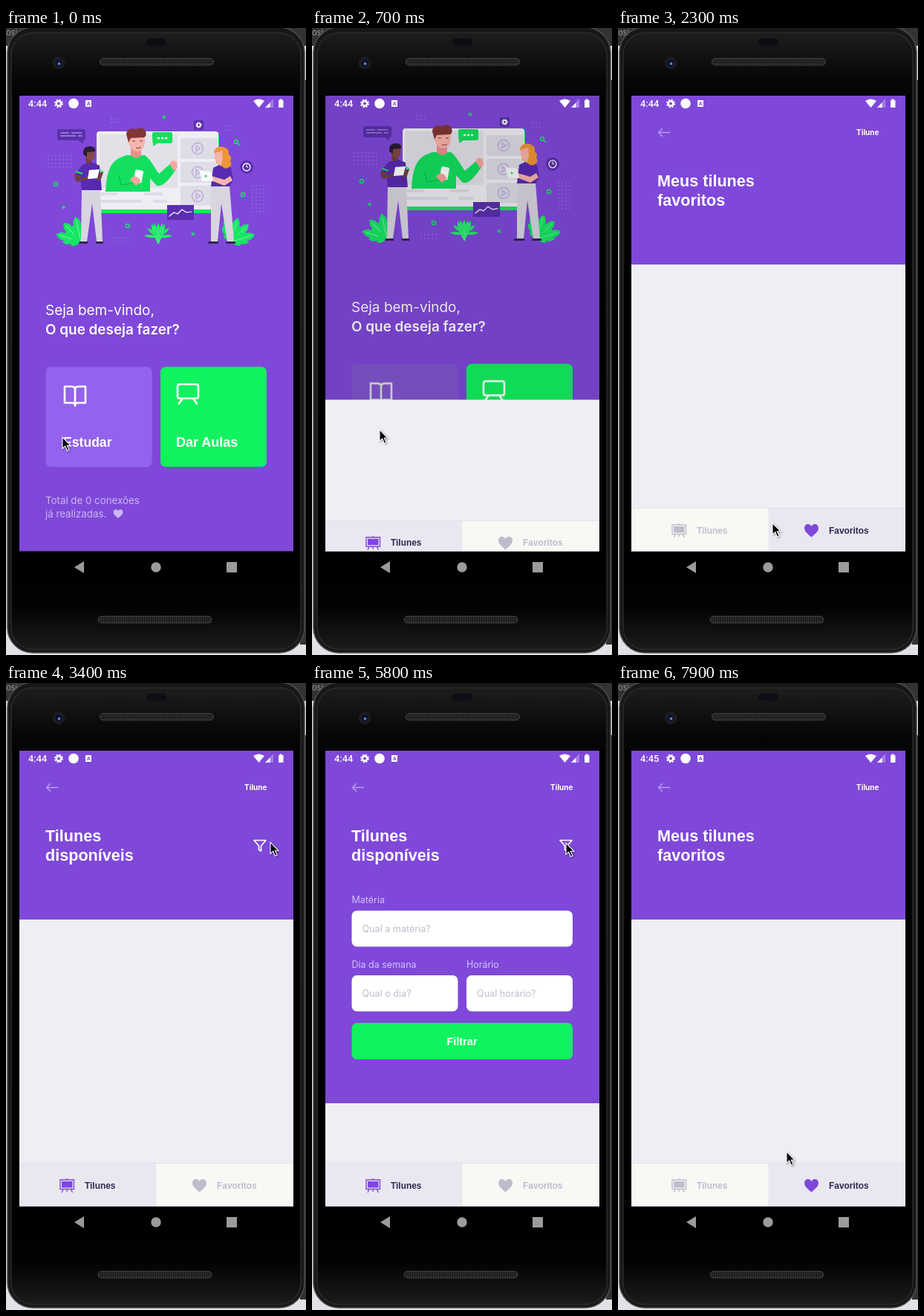
Write an HTML page that moves like this. It is 404 px wide and 843 px high and loops after 8 s.

```html
<!DOCTYPE html>
<html lang="pt-BR">
<head>
<meta charset="utf-8">
<style>
html, body { margin: 0; width: 100%; height: 100%; overflow: hidden; background: #e2e2e6 }
svg { display: block }
text { font-family: "Liberation Sans", Arial, sans-serif; font-weight: 700; fill: #fff }
.soft { font-family: Inter, sans-serif; font-weight: 400 }
.semi { font-family: Inter, sans-serif; font-weight: 600 }
.title { font-size: 21.6px }
.tab text { font-size: 11.9px; fill: #c1bccc }
.tab rect.bg { fill: #f7f9f5 }
.tab { color: #c1bccc }
.tab.on { color: #7f48d9 }
.tab.on text { fill: #32264d }
.tab.on rect.bg { fill: #e9e8f1 }
.line { fill: none; stroke: #fff; stroke-linecap: round; stroke-linejoin: round }
</style>
</head>
<body>
<svg width="404" height="843" viewBox="0 0 404 843">
<defs>
  <clipPath id="screen"><path d="M18 91H387V703.5H18Z"/></clipPath>
  <clipPath id="reveal"><rect id="window" x="18" y="91" width="369" height="613"/></clipPath>
  <pattern id="dots" width="5" height="5" patternUnits="userSpaceOnUse"><circle cx="2" cy="2" r=".7" fill="#a783ea"/></pattern>
  <pattern id="mesh" width="3" height="3" patternUnits="userSpaceOnUse"><path d="M0 0H2V2H0Z" fill="#343434"/></pattern>
  <linearGradient id="body" x2="0" y2="1">
    <stop stop-color="#1d1d1d"/><stop offset=".08" stop-color="#050505"/>
    <stop offset=".93" stop-color="#020202"/><stop offset="1" stop-color="#1c1c1c"/>
  </linearGradient>
  <path id="broad" d="M0 0C-3-2-7-5-6-9L-4-8C-7-12-7-15-5-18L-3-16C-5-20-3-23 0-26C3-23 5-20 3-16L5-18C7-15 7-12 4-8L6-9C7-5 3-2 0 0"/>
  <path id="thin" d="M-.6 0C-1-6-3-11-3-15Q-2-22 0-26Q2-22 3-15C3-11 1-6 .6 0Z"/>
  <path id="heart" d="M0 9C-6 4-9.5 1-9.5-3.2C-9.5-9-2.5-10.5 0-5.5C2.5-10.5 9.5-9 9.5-3.2C9.5 1 6 4 0 9Z"/>
  <g id="gear" fill="none" stroke="#fff"><circle r="3.2" stroke-width="2.4"/><circle r="5" stroke-width="1.8" stroke-dasharray="2.2 1.73"/></g>
  <g id="play" fill="none" stroke="#c3b5e0" stroke-width="1.8"><circle r="7.5"/><path d="M-2-3.5V3.5L3.5 0Z"/></g>
  <g id="speaker"><rect width="153" height="9" rx="4.5" fill="#161616"/><rect width="153" height="9" rx="4.5" fill="url(#mesh)" stroke="#454545"/></g>
</defs>

<!-- desktop and phone -->
<path d="M0 0H404V24H0ZM396 70H404V829H396Z" fill="#333"/>
<text class="soft" x="0" y="10" font-size="11" style="fill:#999">osi</text>
<rect x="2" y="-1" width="400" height="841" rx="34" fill="#171717" stroke="#4a4a4a" stroke-width="1.600"/>
<rect x="7" y="6.500" width="390" height="829" rx="29" fill="url(#body)" stroke="#2b2b2b" stroke-width="1.500"/>
<path d="M10 90H394V750H10Z"/>
<rect x="189" y="14" width="27" height="10" rx="5" fill="#0d0d14"/>
<circle cx="71" cy="47" r="8.500" fill="#1c1c20"/><circle cx="71" cy="47" r="4.500" fill="#0b1230"/><circle cx="71.500" cy="48" r="1.800" fill="#6d8be0"/>
<use href="#speaker" x="126.500" y="41"/><use href="#speaker" x="124" y="791"/>
<path d="M105 717V733L92 725ZM297 718H311V732H297Z" fill="#9b9b9b"/><circle cx="202" cy="725" r="6.700" fill="#9b9b9b"/>

<g clip-path="url(#screen)">
<path d="M18 91H387V704H18Z" fill="#7f48d9"/>
<g id="home">
  <path d="M53 168H88V189H53ZM331 210H351V249H331ZM140 120H155V128H140ZM295 130H310V138H295ZM145 279H170V288H145Z" fill="url(#dots)"/>
  <g id="plants" fill="#17e663"></g>
  <!-- monitor -->
  <rect x="123" y="140" width="164" height="109" rx="4" fill="#17e663"/>
  <rect x="122" y="139" width="164" height="105" rx="4" fill="#f0eef5"/>
  <path d="M126 143H231V215H126Z" fill="#e2e1e8"/>
  <g fill="#dedde6">
    <rect x="235" y="148" width="50" height="28" rx="3"/><rect x="235" y="180" width="50" height="28" rx="3"/><rect x="235" y="212" width="50" height="27" rx="3"/>
    <path d="M127 221H150V225H127ZM186 221H211V225H186ZM127 231H183V235H127ZM198 231H217V235H198Z"/>
  </g>
  <use href="#play" x="258" y="162"/><use href="#play" x="258" y="194"/><use href="#play" x="258" y="226"/>
  <!-- presenter -->
  <path d="M134 220C136 186 143 177 162 171H187C196 178 200 188 206 196L222 182L229 190C219 205 211 214 203 212L194 202V220Z" fill="#13df5e"/>
  <path d="M152 198L155 211L174 208" fill="none" stroke="#0cae47"/>
  <path d="M220 183L224 178L230 180L231 188L226 192Z" fill="#f4a7a0"/>
  <path d="M168 158H182V172Q175 178 168 171Z" fill="#ea918c"/>
  <path d="M165 145H187V155Q185 166 176 166Q167 164 165 154Z" fill="#f7b4aa"/>
  <path d="M165 154L162 143Q163 133 175 136Q186 132 188 139Q190 145 186 147L168 148Z" fill="#823536"/>
  <path d="M170 152H174M180 152H184M175 161Q179 163 182 160" fill="none" stroke="#713637"/>
  <rect x="173" y="191" width="11" height="17" rx="2" fill="#fff" transform="rotate(10 179 199)"/>
  <path d="M167 204Q171 197 178 201L182 206L175 212Z" fill="#f4a7a0"/>
  <!-- messages -->
  <path d="M199 140H222Q224 140 224 142V153Q224 155 222 155H204L198 159V155Q197 154 197 142Q197 140 199 140" fill="#13df5e"/>
  <path d="M205 148H206M210 148H211M215 148H216" class="line" stroke-width="2.500"/>
  <path d="M71 136H105Q107 136 107 138V149Q107 151 105 151H104V156L98 151H71Q69 151 69 149V138Q69 136 71 136" fill="#5b2fae"/>
  <path d="M73 141H85M88 141H102M73 145H94M97 145H103" stroke="#a98bdd" stroke-width="1.300"/>
  <!-- left figure -->
  <path d="M102 216H127L130 287H122L116 236L109 287H101Z" fill="#d8d5e0"/>
  <path d="M99 287H110V290H98ZM121 287H131V290H121Z" fill="#32264d"/>
  <path d="M103 184L115 180L126 185L129 218H102L100 202L93 196Z" fill="#572ab0"/>
  <path d="M94 193L103 196M126 191L131 194" stroke="#17e663" stroke-width="2"/>
  <path d="M93 196L101 199L99 203L113 198L115 202L96 207Q91 204 93 196M107 173H115V182L108 183ZM126 194L131 194L128 203L121 205Z" fill="#713f3f"/>
  <path d="M106 164H119V175Q114 182 108 175Z" fill="#814a46"/>
  <path d="M104 170Q103 159 113 159Q121 159 120 166L109 167V173Z" fill="#291d37"/>
  <path d="M112 191L126 190L123 202L110 203Z" fill="#fff"/>
  <!-- right figure -->
  <path d="M276 212H301L307 287H298L290 236L285 287H276Z" fill="#d8d5e0"/>
  <path d="M273 287H286V290H271ZM297 287H309V290H296Z" fill="#32264d"/>
  <path d="M279 188L291 182L303 188L306 205L301 213H276Z" fill="#572ab0"/>
  <path d="M280 166Q283 158 293 160Q301 162 300 170Q305 174 302 178Q306 185 299 188Q294 190 291 186L283 181Z" fill="#ed9635"/>
  <path d="M281 168L291 165L292 176L289 186L284 180Q280 178 281 168M277 199L294 204L302 199L305 205L294 212L276 205Z" fill="#f6b4aa"/>
  <path d="M260 191L276 193L279 206L264 206Z" fill="#f8f7fc"/><circle cx="269" cy="199" r="1.500" fill="#13df5e"/>
  <!-- small ornaments -->
  <path d="M217 238H253V258H217Z" fill="#5b2fae"/>
  <path d="M220 253L226 248L231 250L237 244L243 248L250 247" class="line" stroke-width="1.200"/>
  <rect x="253" y="124" width="13" height="13" rx="2" fill="#5b2fae"/><use href="#gear" transform="translate(259.500 130.500) scale(.7)"/>
  <circle cx="324" cy="187" r="9" fill="#5b2fae"/><circle cx="324" cy="187" r="5" class="line" stroke-width="1.300"/><path d="M324 184V187H326" class="line"/>
  <g fill="none" stroke="#17e663" stroke-width="1.500">
    <circle cx="67" cy="210" r="2.500"/><circle cx="164" cy="266" r="2.500"/><circle cx="319" cy="224" r="2.500"/><circle cx="310" cy="153" r="2.500"/>
    <path d="M312 155L315 158M75 241H80M77.500 238.500V243.500M211 118L215 122M215 118L211 122M250 275L254 279M254 275L250 279"/>
  </g>
  <!-- home text and cards -->
  <text class="soft" x="53" y="386" font-size="19">Seja bem-vindo,</text>
  <text class="semi" x="53" y="412" font-size="18.900">O que deseja fazer?</text>
  <rect x="53.500" y="455.500" width="143" height="134.500" rx="7" fill="#9463ed"/>
  <rect x="208" y="455.500" width="143" height="134.500" rx="7" fill="#11f25f"/>
  <g class="line" stroke-width="2.600">
    <path d="M93 486Q93 482 88 482H79V504H89Q93 504 93 508ZM93 486Q93 482 98 482H107V504H97Q93 504 93 508"/>
    <path d="M234 479H256Q259 479 259 482V495Q259 498 256 498H234Q231 498 231 495V482Q231 479 234 479M238 498L233 505M252 498L257 505"/>
  </g>
  <text x="77" y="563" font-size="17.600">Estudar</text><text x="229" y="563" font-size="18">Dar Aulas</text>
  <rect id="cardPress" x="53.500" y="455.500" width="143" height="134.500" rx="7"/>
  <text class="soft" x="53" y="640" font-size="13.300" style="fill:#ccb6f3">Total de 0 conexões</text>
  <text class="soft" x="53" y="657.500" font-size="13.300" style="fill:#ccb6f3">já realizadas.</text>
  <use href="#heart" transform="translate(151 653) scale(.68)" fill="#ccb6f3"/>
</g>
<path id="shade" d="M18 91H387V704H18Z"/>

<g clip-path="url(#reveal)"><g id="list">
  <path d="M18 91H387V704H18Z" fill="#eeeef4"/>
  <rect id="header" x="18" y="91" width="369" height="227" fill="#7f48d9"/>
  <g id="topBar">
    <path d="M69.500 140.500H54.500M59.500 135.500L54.500 140.500L59.500 145.500" class="line" style="stroke:#b99af0" stroke-width="1.500"/>
    <text class="semi" x="321" y="144" font-size="10" style="font-weight:700">Tilune</text>
  </g>
  <text class="title" x="53" y="213" id="title1"></text>
  <text class="title" x="53" y="239" id="title2"></text>
  <g id="filter">
    <circle id="ripple" cx="341.500" cy="218.500" r="10"/>
    <path d="M334 211.500H350L343.500 219V226L340.500 224.300V219Z" class="line" stroke-width="1.700"/>
  </g>
  <g id="form"></g>
  <g id="tabList" class="tab">
    <rect class="bg" x="18" y="646" width="184.500" height="58"/>
    <path d="M73 668H91.500V680.500H73ZM77 681L75 685M87.500 681L89.500 685M82.200 681V684M82.200 668V666" fill="none" stroke="currentColor" stroke-width="1.400"/>
    <path d="M75 670H89.500V678.500H75Z" fill="currentColor"/>
    <text x="106" y="679.500">Tilunes</text>
  </g>
  <g id="tabFav" class="tab">
    <rect class="bg" x="202.500" y="646" width="185" height="58"/>
    <use href="#heart" x="260.500" y="675.500" fill="currentColor"/>
    <text x="284" y="679.500">Favoritos</text>
  </g>
  <path d="M18 645.500H387" stroke="#e2e2ea"/>
</g></g>

<!-- status bar -->
<text id="clock" x="30" y="106" font-size="12.800" style="font-family:Roboto,sans-serif;font-weight:500"></text>
<use href="#gear" x="71" y="101.500"/>
<g fill="#fff">
  <circle cx="91" cy="101.500" r="6.800"/>
  <path d="M107 97H115V106H107ZM333 98Q340.500 93 348 98L340.500 107ZM360 95.500V107H349Z"/>
  <path d="M367 97H368.500V95.500H371.500V97H373.500V107H367Z"/>
</g>
<path d="M355 95V100.500L360 95Z" fill="#7f48d9"/><path d="M355.500 100V107H360V95.500Z" fill="#a47ee5"/>
<text x="108.700" y="104.300" font-size="7" style="fill:#7f48d9">A</text>
</g>

<path id="cursor" d="M0 0V15.500L3.700 12.200L6.400 18.500L9 17.400L6.300 11.300H11Z" fill="#000" stroke="#fff" stroke-width="1.100" style="filter:drop-shadow(1px 1px 1px #0006)"/>
</svg>

<script>
const LOOP = 8000, STEP = 100, HEIGHT = 613;
const $ = id => document.getElementById(id);
const clamp = v => Math.max(0, Math.min(1, v));

// time, x, y
const cursorPath = [
  [0, 76, 550], [400, 91, 540], [1100, 91, 540], [1400, 249, 619], [1500, 249, 619],
  [1700, 291, 667], [2200, 291, 667], [2400, 125, 664], [2900, 125, 664], [3400, 356, 214],
  [4000, 356, 214], [4200, 350, 201], [4300, 345, 208], [5000, 345, 208], [5100, 343, 214],
  [5400, 343, 214], [5500, 342, 215], [6500, 342, 215], [7000, 270, 672], [7400, 270, 672],
  [7600, 247, 624], [7800, 247, 624], [7900, 227, 630], [8000, 227, 630]
];

function cursorAt(t) {
  const i = cursorPath.findIndex(k => k[0] > t);
  const [t0, x0, y0] = cursorPath[i - 1], [t1, x1, y1] = cursorPath[i];
  const f = (t - t0) / (t1 - t0);
  return [x0 + (x1 - x0) * f, y0 + (y1 - y0) * f];
}

function bezier(x, x1, y1, x2, y2) {
  const at = (s, a, b) => 3 * a * s * (1 - s) ** 2 + 3 * b * s * s * (1 - s) + s ** 3;
  let lo = 0, hi = 1;
  for (let i = 0; i < 24; i++) {
    const mid = (lo + hi) / 2;
    if (at(mid, x1, x2) < x) lo = mid; else hi = mid;
  }
  return at(lo, y1, y2);
}

// leaf shape, base x and y, first and last leaf angle, leaf count, size
const plant = (leaf, x, y, from, to, count, size) => Array.from({ length: count }, (_, i) => {
  const angle = from + (to - from) * i / (count - 1);
  return `<g transform="translate(${x} ${y}) rotate(${angle}) scale(${size})"><use href="#${leaf}"/>
    <path d="M0 0V-22" stroke="#7ff5a9" stroke-width=".7"/></g>`;
}).join('');
$('plants').innerHTML = plant('broad', 101, 288, -72, -12, 3, 1.35) + plant('broad', 303, 288, -12, 72, 4, 1.3)
  + plant('thin', 205, 290, -18, 18, 3, 1.1) + plant('thin', 205, 281, -85, 85, 6, .75);

const field = (x, y, width, label, hint) => `
  <text class="soft" x="${x}" y="${y + 14}" font-size="12.500" style="fill:#d4c2ff">${label}</text>
  <rect x="${x}" y="${y + 24}" width="${width}" height="48.500" rx="7" fill="#fff"/>
  <text class="soft" x="${x + 14}" y="${y + 53}" font-size="12.600" style="fill:#c1bccc">${hint}</text>`;
$('form').innerHTML = field(53.5, 282, 297.5, 'Matéria', 'Qual a matéria?')
  + field(53.5, 369, 143, 'Dia da semana', 'Qual o dia?')
  + field(208, 369, 143, 'Horário', 'Qual horário?')
  + `<rect x="53.500" y="457" width="297.500" height="49" rx="7" fill="#11f25f"/>
     <text x="202" y="486.500" font-size="14.500" text-anchor="middle">Filtrar</text>`;

function draw(t) {
  // Card press, then the list is uncovered from the bottom
  const p = bezier(clamp((t - 663) / 425), .20833, .82, .25, 1);
  $('cardPress').setAttribute('opacity', .13 * clamp((t - 400) / 300));
  $('home').setAttribute('transform', `translate(0 ${-.02 * HEIGHT * p})`);
  $('shade').setAttribute('opacity', .1 * clamp(p / .36));
  $('window').setAttribute('y', 91 + HEIGHT * (1 - p));
  $('list').setAttribute('transform', `translate(0 ${.041 * HEIGHT * (1 - p)})`);

  // Tabs
  const favourites = t >= 2000 && t < 2600 || t >= 7300;
  const lastSwitch = [7300, 2600, 2000].find(s => t >= s) ?? -LOOP;
  $('topBar').setAttribute('opacity', clamp((t - lastSwitch + 50) / 300));
  $('title1').textContent = favourites ? 'Meus tilunes' : 'Tilunes';
  $('title2').textContent = favourites ? 'favoritos' : 'disponíveis';
  $('tabList').classList.toggle('on', !favourites);
  $('tabFav').classList.toggle('on', favourites);
  $('filter').style.display = favourites ? 'none' : '';

  // Filter form
  const open = t >= 5500 && t < 6400;
  $('form').style.display = open ? '' : 'none';
  $('header').setAttribute('height', open ? 474 : 227);
  const ripple = t >= 6400 ? .18 * clamp((6700 - t) / 300) : t >= 5500 ? .18 * clamp((5800 - t) / 300) : t >= 5400 ? .05 : 0;
  $('ripple').setAttribute('opacity', ripple);

  $('clock').textContent = t < 7300 ? '4:44' : '4:45';
  $('cursor').setAttribute('transform', `translate(${cursorAt(t)})`);
}

function tick() {
  draw(Math.floor(performance.now() % LOOP / STEP) * STEP);
  requestAnimationFrame(tick);
}
tick();
</script>
</body>
</html>
```
